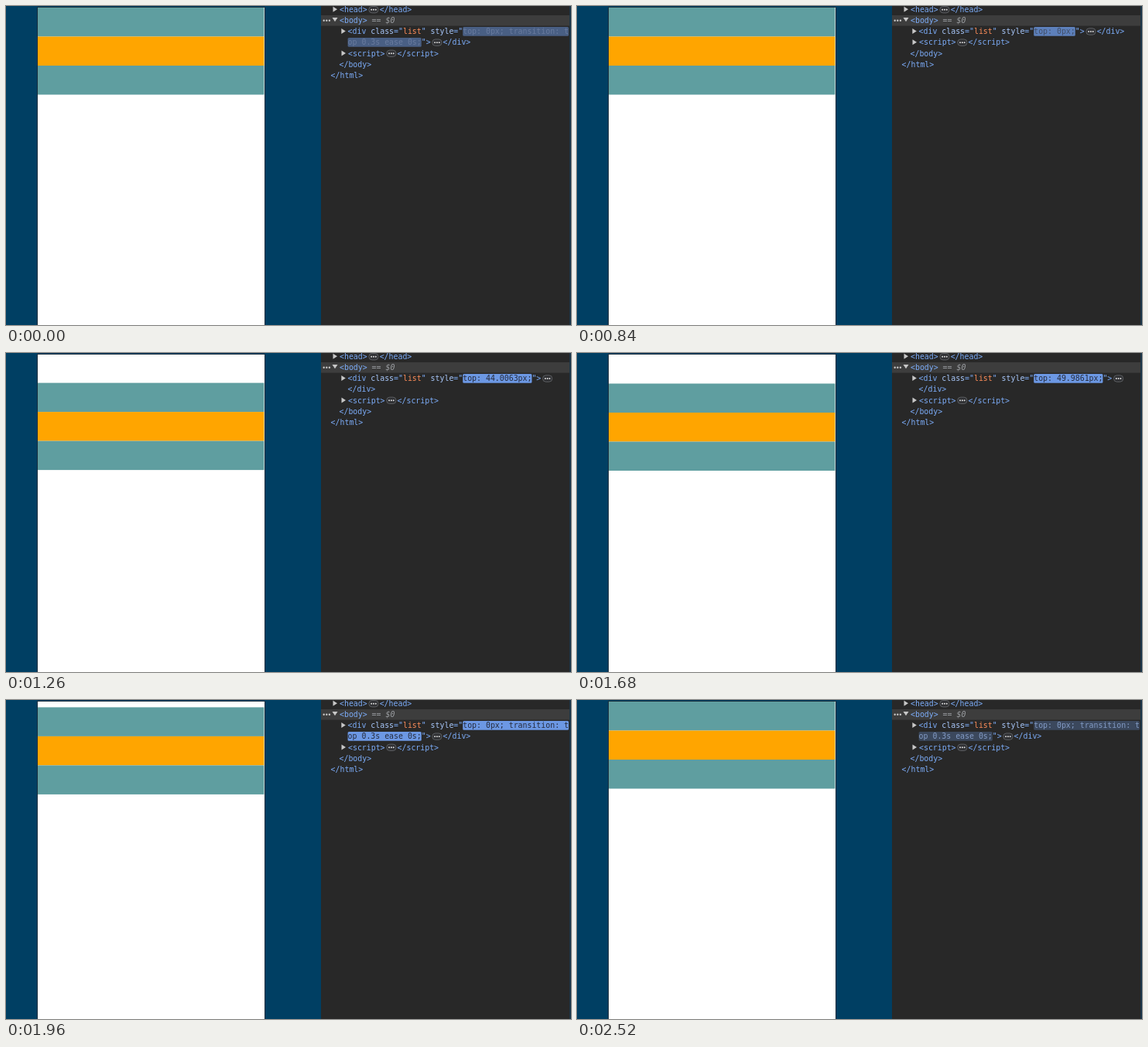
These frames come from a looping animation (730 px wide and 412 px high, 2590 ms). An HTML page with a canvas:

```html
<!DOCTYPE html>
<html lang="en">
<head>
<meta charset="utf-8">
<title>Pull and release</title>
<style>
html, body { margin: 0; width: 100%; height: 100%; overflow: hidden; background: #003f63; }
canvas { display: block; width: 730px; height: 412px; }
</style>
</head>
<body>
<canvas id="stage" width="730" height="412"></canvas>
<script>
const ctx = document.getElementById('stage').getContext('2d');
const LOOP = 2590, STEP = 70, FADE = 780;
const TOUCH = 670, RELEASE = 1810, EASE_TIME = 300, RESTORED = 1930;
const SCALE = 0.75, LINE = 14.15;
const BLUE = '#7cacf8', PALE = '#a8c7fa', ORANGE = '#fe8d59', GREY = '#9a9da1';
const FONT = '9.9px "DejaVu Sans Mono", Menlo, monospace';
const EASED = 'top: 0px; transition: top 0.3s ease 0s;';

// Finger position as [time, CSS pixels]
const DRAG = [[910, 0], [980, 4], [1050, 16.5], [1120, 40], [1190, 46.4],
  [1260, 48.8], [1330, 49.5], [1470, 49.9], [1680, 50]];

const lineY = row => 4.3 + row * LINE;

function rect(x, y, w, h, color) {
  ctx.fillStyle = color;
  ctx.fillRect(x, y, w, h);
}

function mix(from, to, k) {
  return `rgb(${from.map((v, i) => Math.round(v + (to[i] - v) * k))})`;
}

function cssEase(x) {
  let lo = 0, hi = 1;
  const curve = (s, a, b) => 3 * (1 - s) ** 2 * s * a + 3 * (1 - s) * s * s * b + s ** 3;
  for (let i = 0; i < 24; i++) {
    const mid = (lo + hi) / 2;
    if (curve(mid, 0.25, 0.25) < x) lo = mid; else hi = mid;
  }
  return curve(lo, 0.1, 1);
}

function listTop(t) {
  if (t >= RELEASE) return 50 * (1 - cssEase(Math.min(1, (t - RELEASE) / EASE_TIME)));
  const next = DRAG.findIndex(p => p[0] >= t);
  if (next < 0) return 50;
  if (next === 0) return 0;
  const [t0, a] = DRAG[next - 1], [t1, b] = DRAG[next];
  return a + (b - a) * (t - t0) / (t1 - t0);
}

// Attribute text shown in the inspector, with the age of its last update
function styleState(t) {
  if (t < TOUCH) return { value: EASED, age: t + 400 };
  if (t < 1120) return { value: 'top: 0px;', age: t - TOUCH };
  if (t < RESTORED) {
    const last = Math.min(t, 1680);
    const top = 50 - 5.9937 * Math.exp(-(last - 1260) * 0.014445);
    return { value: `top: ${top.toFixed(4)}px;`, age: t - last };
  }
  return { value: EASED, age: Math.max(0, t - RESTORED - 30) };
}

function text(str, x, row, color, italic) {
  ctx.font = (italic ? 'italic ' : '') + FONT;
  ctx.fillStyle = color;
  ctx.fillText(str, x, lineY(row) + 3.6);
  return x + ctx.measureText(str).width;
}

function dots(x, y, gap, r, color) {
  ctx.fillStyle = color;
  for (let i = -1; i <= 1; i++) {
    ctx.beginPath();
    ctx.arc(x + i * gap, y, r, 0, 7);
    ctx.fill();
  }
}

function badge(x, row) {
  const y = lineY(row) + 0.4;
  ctx.beginPath();
  ctx.roundRect(x + 2.2, y - 4.2, 12.2, 8.4, 4);
  ctx.fillStyle = '#303134';
  ctx.fill();
  ctx.strokeStyle = '#66696d';
  ctx.lineWidth = 0.8;
  ctx.stroke();
  dots(x + 8.3, y, 2.8, 0.95, '#e3e3e3');
  return x + 16;
}

function arrow(x, y, open) {
  ctx.fillStyle = '#c7c7c7';
  ctx.beginPath();
  if (open) {
    ctx.moveTo(x - 3.5, y - 2.7); ctx.lineTo(x + 3.5, y - 2.7); ctx.lineTo(x, y + 2.6);
  } else {
    ctx.moveTo(x - 2.5, y - 3.5); ctx.lineTo(x + 3, y); ctx.lineTo(x - 2.5, y + 3.5);
  }
  ctx.fill();
}

function node(name, x, row) {
  arrow(x - 6, lineY(row), false);
  x = badge(text(`<${name}>`, x, row, BLUE), row);
  text(`</${name}>`, x, row, BLUE);
}

function styleValue(str, x, row, glow) {
  const w = ctx.measureText(str).width;
  if (glow > 0) {
    ctx.fillStyle = mix([40, 40, 40], [108, 152, 228], glow);
    ctx.beginPath();
    ctx.roundRect(x, lineY(row) - 5.7, w, 11.8, 1.5);
    ctx.fill();
  }
  return text(str, x, row, mix([168, 199, 250], [38, 44, 62], glow));
}

function drawPage(t) {
  rect(0, 0, 407, 412, '#003f63');
  rect(40.2, 1.2, 294.5, 411, '#1c2a33');
  rect(41, 2, 293, 410, '#fff');
  const y = 2 + listTop(t) * SCALE, h = 50 * SCALE;
  ['#5f9ea0', '#ffa500', '#5f9ea0'].forEach((color, i) => rect(41, y + i * h, 292.4, h, color));
}

function drawInspector(t) {
  rect(407, 0, 321, 412, '#282828');
  rect(728, 0, 2, 412, '#1b3548');
  rect(407, 12, 321, 13.6, '#3d3d3d');

  node('head', 431, 0);
  dots(414.3, lineY(1) + 0.3, 3.6, 1.2, '#c7c7c7');
  arrow(425, lineY(1) - 0.8, true);
  let x = text('<body>', 431, 1, BLUE);
  x = text(' == ', x, 1, GREY);
  text('$0', x, 1, GREY, true);

  const { value, age } = styleState(t);
  const glow = Math.max(0, 1 - age / FADE);
  let row = 2;
  arrow(435.8, lineY(row), false);
  x = text('<div', 441.6, row, BLUE);
  x = text(' class', x, row, PALE);
  x = text('="', x, row, BLUE);
  x = text('list', x, row, ORANGE);
  x = text('"', x, row, BLUE);
  x = text(' style', x, row, PALE);
  x = text('="', x, row, BLUE);
  x = styleValue(value.slice(0, 23), x, row, glow);
  if (value.length > 23) x = styleValue(value.slice(23), 441.6, ++row, glow);
  x = badge(text('">', x, row, BLUE), row);
  if (x > 690) {
    x = 441.6;
    row++;
  }
  text('</div>', x, row, BLUE);

  node('script', 442, ++row);
  text('</body>', 430.5, ++row, BLUE);
  text('</html>', 419.6, ++row, BLUE);
}

function frame(now) {
  const t = Math.floor((now % LOOP) / STEP) * STEP;
  drawPage(t);
  drawInspector(t);
  requestAnimationFrame(() => frame(performance.now() - start));
}

const start = performance.now();
frame(0);
</script>
</body>
</html>
```
